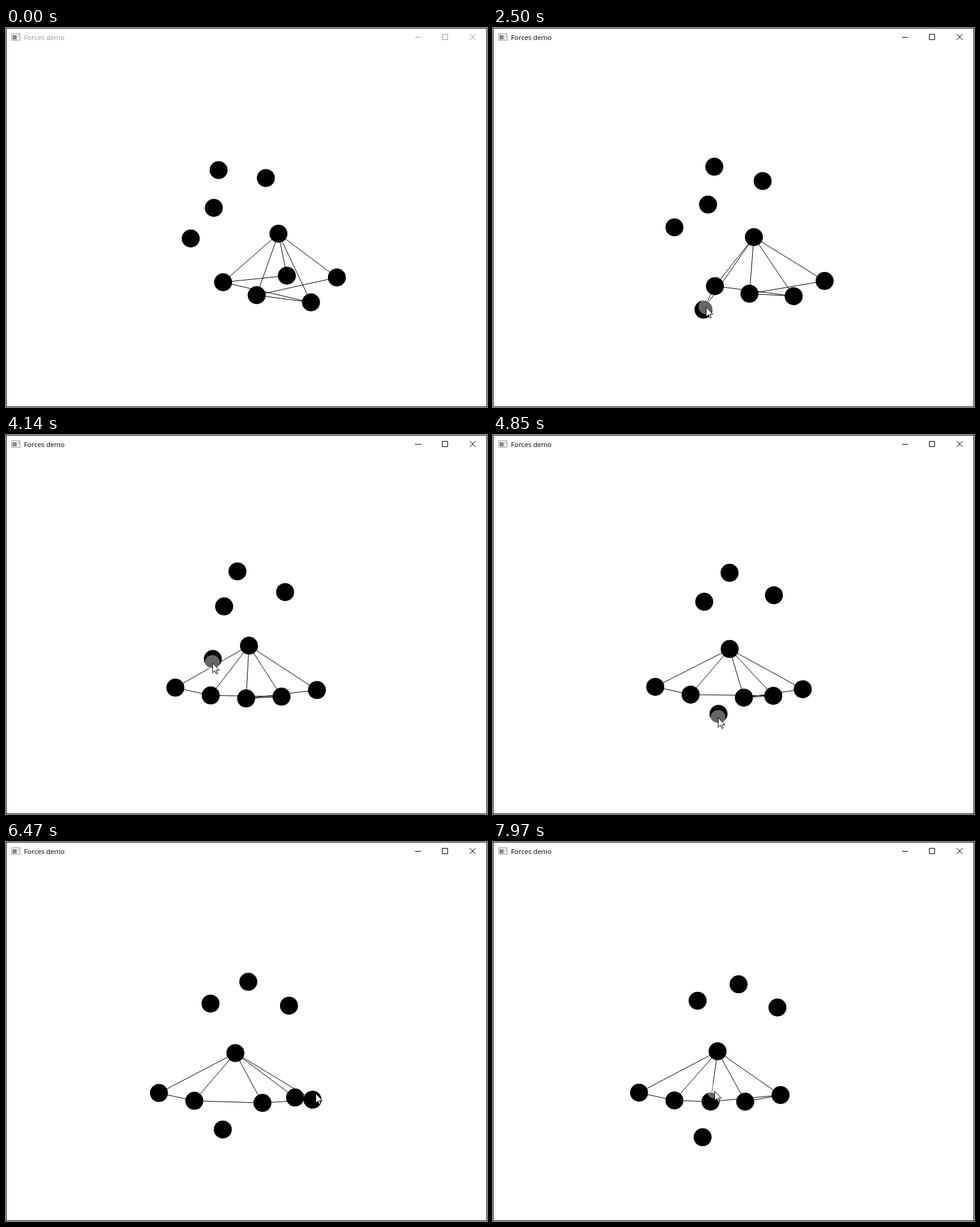
Write an HTML page that moves like this. It is 802 px wide and 632 px high and loops after 8000 ms.

```html
<!DOCTYPE html>
<html lang="en">
<head>
<meta charset="utf-8">
<title>Forces demo</title>
<style>
  html, body { margin: 0; width: 100%; height: 100%; overflow: hidden; background: #fff; }
  svg { display: block; width: 100vw; height: 100vh; }
  text { font: 11.3px "Open Sans", "Noto Sans", sans-serif; }
</style>
</head>
<body>
<svg viewBox="0 0 802 632">
  <rect width="802" height="632" fill="#fff"/>
  <g>
    <rect x="9.5" y="9.5" width="14" height="11" fill="#f4f4f4" stroke="#a0a0a0"/>
    <rect x="11" y="12" width="6" height="7" fill="#858585"/>
    <rect x="17" y="12" width="2" height="7" fill="#c4c4c4"/>
    <rect x="21" y="11" width="1" height="4" fill="#aaa"/>
  </g>
  <text id="title" x="30" y="20">Forces demo</text>
  <g id="buttons" fill="none">
    <path d="M682 15.5h10M727.5 10.5h9v9h-9z"/>
    <path d="M773.5 10.5l9 9M782.5 10.5l-9 9" stroke-linecap="square"/>
  </g>
  <path id="edges" fill="none" stroke="#000"/>
  <g id="balls"></g>
  <circle id="press" r="12.5" fill="#fff" fill-opacity=".4"/>
  <path id="cursor" d="M.5 .5V16.5L4.2 13 6.6 18.5 9 17.5 6.6 12.2H11.6Z" fill="#fff" stroke="#000"/>
  <rect x=".5" y=".5" width="801" height="631" fill="none" stroke="#262626"/>
</svg>
<script>
const LOOP = 8000, ENTER = 240, ACTIVE = 1480;
const $ = id => document.getElementById(id);

// Times at which the layout has come to rest
const rests = [ACTIVE, 3440, 5920, 7970];

// Where the unlinked balls, the hub and the middle of its fan rest
const free = {
  top: [[354.5, 237], [381.8, 226.3], [402.8, 232.2], [409.5, 237.3]],
  right: [[433.3, 250.2], [464, 259.5], [471.3, 272.2], [474.3, 276]],
  left: [[346.5, 300], [369.2, 289.5], [341, 270.5], [341.2, 264.7]]
};
const loosePath = [[308, 351], [297.7, 316], [369.8, 492], [349.5, 492.3]];
const hubPath = [[454.3, 343], [418, 353.7], [388, 348], [374.5, 349]];
const fanPath = [[460, 441], [415, 441], [381, 437], [361.5, 436]];

// Linked balls: starting point, place in the fan before and after the swap
const fan = {
  c: { start: [468.3, 413], from: -2, to: -2 },
  a: { start: [362, 424], from: -1, to: -1 },
  b: { start: [418, 445.5], from: 0, to: 2 },
  d: { start: [508.5, 457.5], from: 1, to: 0 },
  e: { start: [551.7, 416], from: 2, to: 1 }
};
const links = ["hub a", "hub b", "hub c", "hub d", "hub e", "c a", "a d", "d b", "b e"]
  .map(pair => pair.split(" "));

// Pointer way points: time, x, y
const pointer = [
  [ENTER, 661, 611], [760, 299, 357], [1220, 471, 408], [1550, 471, 408], [2300, 406, 475],
  [2840, 276, 424], [3440, 298, 318], [4850, 375.3, 471], [5110, 374, 488],
  [5920, 388.5, 421], [6400, 517, 420], [7070, 470, 410], [7970, 369, 415]
];

// Grip is the held ball's offset from the pointer
const drags = [
  { ball: "c", from: ACTIVE, to: 2840, grip: [-4.3, 4.7] },
  { ball: "loose", from: 3520, to: 5110, grip: [0.7, -6] },
  { ball: "b", from: 5780, to: 6450, grip: [-5, 10] },
  { ball: "d", from: 7900, to: LOOP, grip: [-5.5, 16] }
];

const balls = {};
for (const name of ["hub", "loose", ...Object.keys(free), ...Object.keys(fan)]) {
  const ball = document.createElementNS("http://www.w3.org/2000/svg", "circle");
  ball.setAttribute("r", 15);
  balls[name] = $("balls").appendChild(ball);
}

const progress = (t, from, to) => Math.min(1, Math.max(0, (t - from) / (to - from)));
const smooth = u => u * u * (3 - 2 * u);
const settle = u => Math.sin(u * Math.PI / 2);
const mix = (p, q, u) => p.map((v, i) => v + (q[i] - v) * u);

function set(el, attrs) {
  for (const key in attrs) el.setAttribute(key, attrs[key]);
}

// The first move starts slowly; later ones use the given ease
function travel(path, t, ease) {
  const i = t < rests[1] ? 0 : t < rests[2] ? 1 : 2;
  const u = progress(t, rests[i], rests[i + 1]);
  return mix(path[i], path[i + 1], i ? ease(u) : smooth(u));
}

// Slope at a key: zero at turning points, harmonic mean elsewhere
function slope(keys, i, axis) {
  if (i < 1 || i >= keys.length - 1) return 0;
  const rate = j => (keys[j + 1][axis] - keys[j][axis]) / (keys[j + 1][0] - keys[j][0]);
  const p = rate(i - 1), q = rate(i);
  return p * q > 0 ? 2 * p * q / (p + q) : 0;
}

function pointerAt(t) {
  const keys = pointer, last = keys.length - 1;
  if (t <= keys[0][0]) return keys[0].slice(1);
  if (t >= keys[last][0]) return keys[last].slice(1);
  const i = keys.findIndex(k => k[0] > t) - 1;
  const span = keys[i + 1][0] - keys[i][0];
  const u = (t - keys[i][0]) / span, v = 1 - u;
  return [1, 2].map(axis =>
    keys[i][axis] * (1 + 2 * u) * v * v + keys[i + 1][axis] * (3 - 2 * u) * u * u +
    span * u * v * (slope(keys, i, axis) * v - slope(keys, i + 1, axis) * u));
}

// A grabbed ball follows the pointer and drifts home after release
function pull(name, home, t) {
  return drags.filter(d => d.ball === name).reduce((p, d) => {
    const hold = smooth(progress(t, d.from, d.from + 120)) *
      (1 - smooth(progress(t, d.to, d.to + 500)));
    const held = pointerAt(Math.min(t, d.to)).map((v, i) => v + d.grip[i]);
    return mix(p, held, hold);
  }, home);
}

function layout(t) {
  const pos = {};
  for (const name in free) pos[name] = travel(free[name], t, smooth);

  // The loose ball rises into the gap while the fan is rearranged
  const [lx, ly] = travel(loosePath, t, settle);
  const rise = 17 * Math.sin(Math.PI * progress(t, rests[2], rests[3]));
  pos.loose = pull("loose", [lx, ly - rise], t);

  // Near the fan it parts the linked balls and presses the hub down
  const near = Math.max(0, 1 - Math.abs(pos.loose[1] - 460) / 32);
  const [hx, hy] = travel(hubPath, t, settle);
  pos.hub = [hx, hy + 9 * near];

  const [fx, fy] = travel(fanPath, t, settle);
  const opened = smooth(progress(t, rests[0], rests[1]));
  const swap = smooth(progress(t, rests[2], 7600));
  for (const name in fan) {
    const { start, from, to } = fan[name];
    const slot = from + (to - from) * swap;
    const part = slot < 0 ? 0 : 0.6 * near * (1 - slot / 3);
    const home = [fx + 59 * (slot + part), fy - 4 * slot * slot + slot];
    pos[name] = pull(name, mix(start, home, opened), t);
  }
  return pos;
}

function draw(t) {
  const ink = t < ACTIVE ? "#999" : "#000";
  $("title").setAttribute("fill", ink);
  $("buttons").setAttribute("stroke", ink);

  const pos = layout(t);
  for (const name in pos) set(balls[name], { cx: pos[name][0], cy: pos[name][1] });
  $("edges").setAttribute("d", links.map(([p, q]) => `M${pos[p]}L${pos[q]}`).join(""));

  const [x, y] = pointerAt(t);
  const down = drags.some(d => t >= d.from && t < d.to);
  set($("cursor"), {
    transform: `translate(${Math.round(x)} ${Math.round(y)})`,
    visibility: t < ENTER ? "hidden" : "visible"
  });
  set($("press"), { cx: x, cy: y, visibility: down ? "visible" : "hidden" });
}

const begin = performance.now();
function tick() {
  draw((performance.now() - begin) % LOOP);
  requestAnimationFrame(tick);
}
tick();
</script>
</body>
</html>
```
